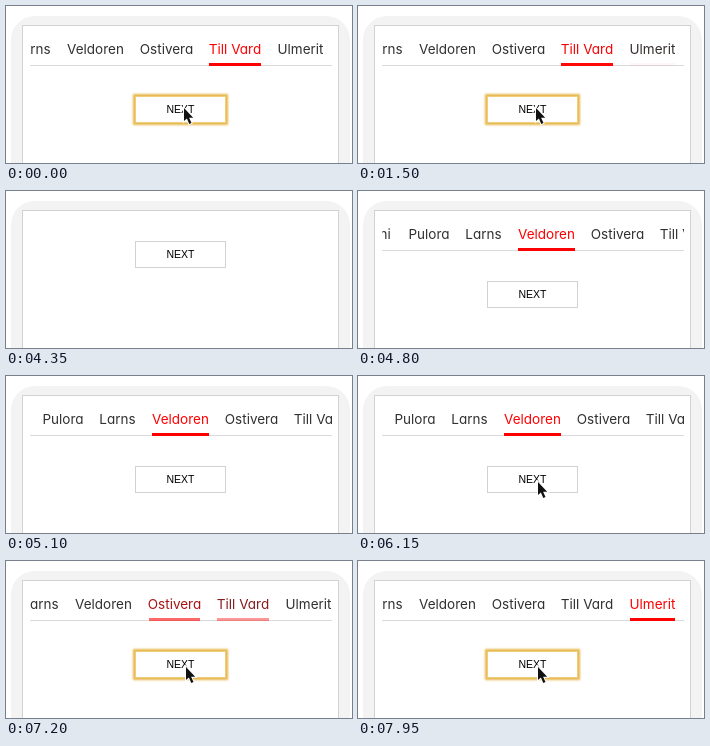
Recreate the animation shown at these times as an HTML page. Size 346 by 157 pixels, loop 8000 ms.

```html
<!DOCTYPE html>
<html lang="en">
<head>
<meta charset="utf-8">
<title>Scrolling tabs</title>
<style>
  html, body { margin: 0; width: 100%; height: 100%; overflow: hidden; background: #fff; }
  #stage { position: relative; width: 346px; height: 157px; overflow: hidden; }
  #stage * { position: absolute; box-sizing: border-box; }
  #shell { left: 5px; top: 10px; width: 339px; height: 190px; border-radius: 24px 24px 0 0; background: #f3f3f3; }
  #page { left: 16px; top: 19px; width: 317px; height: 180px; border: 1px solid #d2d2d2; background: #fff; }
  #nav { left: 24px; top: 30px; width: 302px; height: 32px; overflow: hidden; }
  #rule { left: 0; top: 29px; width: 302px; height: 1px; background: #dadada; }
  #strip { left: 0; top: 0; }
  .tab { top: 3px; height: 28px; display: flex; justify-content: center; white-space: nowrap;
    font: 400 13.5px/20px Inter, "Open Sans", sans-serif; font-feature-settings: "cv11"; }
  .tab i { left: 0; top: 24px; width: 100%; height: 3px; background: #f00; }
  #next { left: 129px; width: 91px; height: 27px; border: 1px solid #d2d2d2; background: #fff; color: #000;
    text-align: center; font: 10.5px/25px "Liberation Sans", Arial, sans-serif; }
  #next.focus { border-color: #f0cd7c; box-shadow: 0 0 2px 2px #e6b84c; }
  #cursor { left: 0; top: 0; width: 14px; height: 20px; overflow: visible; }
</style>
</head>
<body>
<div id="stage">
  <div id="shell"></div>
  <div id="page"></div>
  <div id="nav"><div id="rule"></div><div id="strip"></div></div>
  <div id="next">NEXT</div>
  <svg id="cursor" viewBox="0 0 14 20">
    <path d="M0 0V13L2.9 10.4L5.3 16L7.5 15L5.1 9.8H9.2Z" fill="#111" stroke="#fff" stroke-width="2" paint-order="stroke"/>
  </svg>
</div>
<script>
const LOOP = 8000, STEP = 150, SLIDE = 450;
const $ = id => document.getElementById(id);

// label, left and width, measured from the fourth tab
const tabs = [
  ["Revoni", -171, 45], ["Pulora", -109, 40], ["Larns", -52, 35], ["Veldoren", 0, 57],
  ["Ostivera", 74, 51], ["Till Vard", 142, 52], ["Ulmerit", 211, 45]
].map(([label, x, w]) => {
  const el = document.createElement("div"), bar = document.createElement("i");
  el.className = "tab";
  el.style.left = x + "px";
  el.style.width = w + "px";
  el.append(label, bar);
  $("strip").append(el);
  return { el, bar };
});

// start time, selected tab, previous tab, strip position from and to
const moves = [
  [-1000, 5, 5, 61, 61],
  [1450, 6, 5, 61, 61],
  [4500, 3, 3, 203, 146],
  [6250, 4, 3, 146, 74],
  [7000, 5, 4, 74, 61],
  [7450, 6, 5, 61, 61]
];

// time, x, y; no position means hidden
const pointer = [
  [0, 178, 102], [2250, 246, 58], [2400], [5700, 214, 112],
  [5850, 196, 111], [6000, 184, 109], [6150, 180, 106]
];

const last = (list, t) => list.filter(item => item[0] <= t).pop();
const swing = p => 0.5 - Math.cos(Math.PI * Math.min(1, Math.max(0, p))) / 2;

function draw(t) {
  const [start, now, before, from, to] = last(moves, t);
  const k = swing((t - start) / SLIDE);
  const reloading = t >= 4350 && t < 4500;

  $("nav").style.visibility = reloading ? "hidden" : "visible";
  $("strip").style.transform = `translateX(${Math.round(from + (to - from) * k) - 24}px)`;
  tabs.forEach(({ el, bar }, i) => {
    const on = i === now ? (now === before ? 1 : k) : i === before ? 1 - k : 0;
    const dark = 48 * (1 - on);
    el.style.color = `rgb(${dark + 255 * on}, ${dark}, ${dark})`;
    bar.style.opacity = on;
  });

  $("next").style.top = (reloading ? 50 : 90) + "px";
  $("next").classList.toggle("focus", t < 4350 || t >= 6300);

  const [, x, y] = last(pointer, t);
  $("cursor").style.visibility = x === undefined ? "hidden" : "visible";
  if (x !== undefined) $("cursor").style.transform = `translate(${x}px, ${y}px)`;
}

const origin = performance.now();
function tick() {
  const t = (performance.now() - origin) % LOOP;
  draw(Math.floor(t / STEP) * STEP);
  requestAnimationFrame(tick);
}
tick();
</script>
</body>
</html>
```
